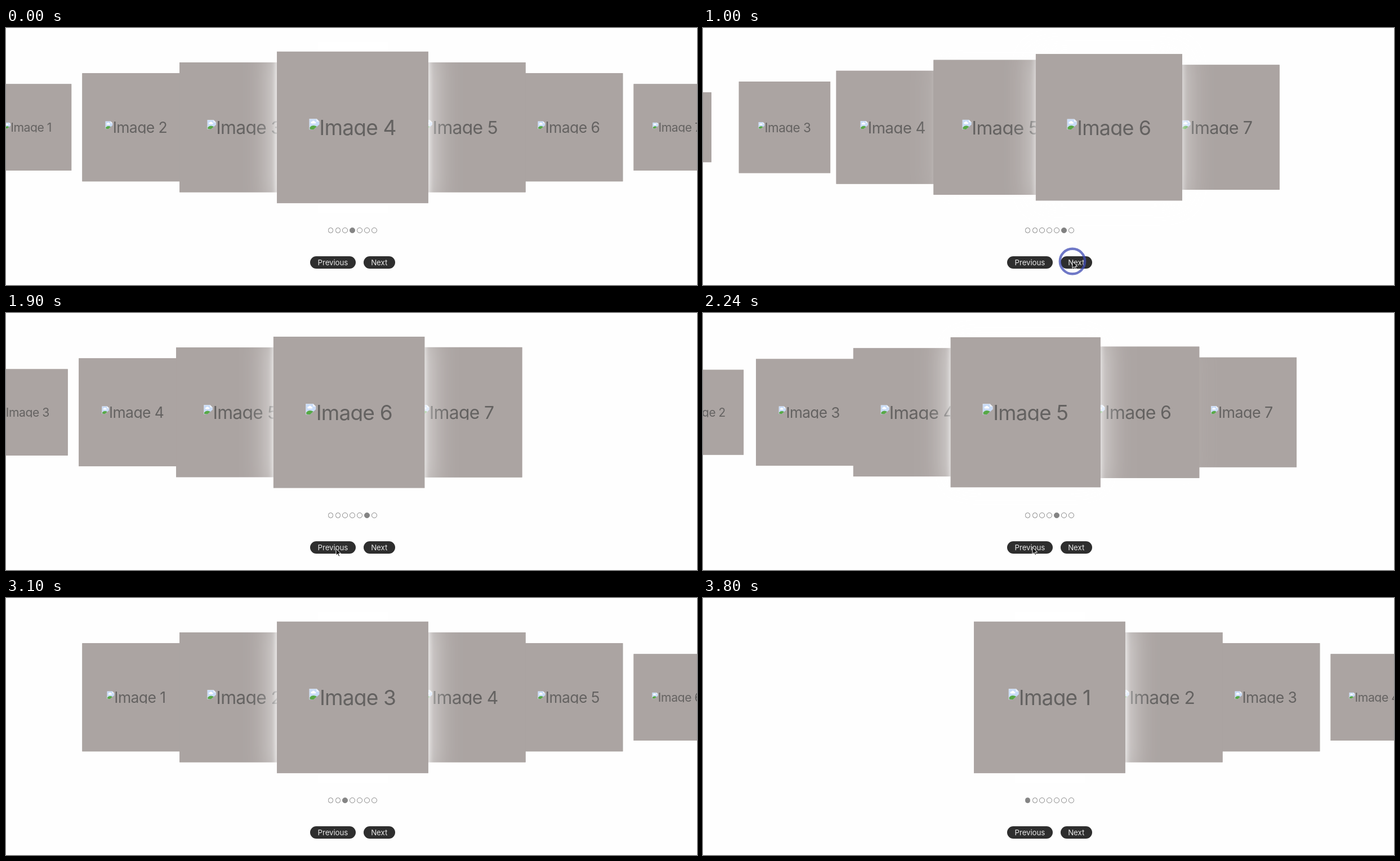
These frames come from a looping animation (1227 by 456 pixels, 3.84 s). An HTML page:

```html
<!DOCTYPE html>
<html lang="en">
<head>
<meta charset="utf-8">
<title>Image carousel</title>
<style>
  html, body { margin: 0; width: 100%; height: 100%; overflow: hidden; background: #fefefe; }
  .stage { position: relative; width: 1227px; height: 456px; overflow: hidden; font-family: Inter, "Open Sans", sans-serif; }
  .card { position: absolute; left: 0; top: 0; width: 191.8px; height: 191.8px; background: #aba4a2; }
  .glow { position: absolute; inset: 0; box-shadow: 0 0 5px 2px rgba(255,255,255,.55), 0 0 36px 3px rgba(255,255,255,.8); }
  .face { position: absolute; inset: 0; background: #aba4a2; }
  .alt { position: absolute; left: 0; right: 0; top: 85.1px; height: 22px; overflow: hidden; display: flex; justify-content: center; align-items: flex-start; white-space: pre; color: #646261; font-size: 26.5px; line-height: 23.6px; letter-spacing: -.022em; }
  .alt svg { flex: none; width: 13.3px; height: 14.3px; }
  .dot { position: absolute; top: 354.2px; width: 9.6px; height: 9.6px; box-sizing: border-box; border: 1.8px solid #808080; border-radius: 50%; }
  .dot.on { background: #808080; }
  .btn { position: absolute; top: 404.8px; height: 22.6px; border-radius: 12px; background: #2e2e2e; color: #e6e6e6; font-size: 13.3px; line-height: 22.6px; text-align: center; letter-spacing: -.005em; }
  .over { position: absolute; left: 0; top: 0; z-index: 300; }
</style>
</head>
<body>
<div class="stage" id="stage">
  <div class="btn" style="left:539.8px;width:81.2px">Previous</div>
  <div class="btn" style="left:634.6px;width:56.2px">Next</div>
  <svg class="over" width="1227" height="456">
    <circle id="ring" r="22.2" fill="none" stroke="#3f4bb4" stroke-width="4.4"/>
    <path id="cursor" d="M0 0V12.2L2.8 9.6L4.8 14L6.7 13.2L4.8 8.9H8.6Z" fill="#111" stroke="#fff" stroke-width="1" stroke-linejoin="round"/>
  </svg>
</div>
<script>
const LOOP = 3840, MOVE = 242, COUNT = 7, FIRST = 4;
const MID_X = 615.25, MID_Y = 176.1, SIZE = 191.8;

// [start time, slide to go to]
const moves = [[570, 5], [887, 6], [1287, 7], [1690, 6], [2078, 5],
               [2460, 4], [2840, 3], [3222, 2], [3545, 1]];
const clicks = moves.slice(0, 6).map(m => m[0]);
// [time, x, y]
const pointer = [[300, 672, 462], [500, 656, 414], [1390, 656, 414], [1480, 597.5, 416],
                 [1600, 586, 418], [2020, 586, 418], [2240, 585, 415.5], [2740, 585, 415.5]];

const stage = document.getElementById('stage');
const ring = document.getElementById('ring');
const cursor = document.getElementById('cursor');

const icon = `<svg viewBox="0 0 13.3 14.3">
  <path d="M0 0H9.3L13 3.7V7.2L5.2 14H0Z" fill="#c9dcf8"/>
  <path d="M2.2 5.4a1.5 1.5 0 0 1 1.6-1.7a1.9 1.9 0 0 1 3.5.3a1.2 1.2 0 0 1 .7 2.2H3Z" fill="#fff"/>
  <path d="M.6 13.4V11.2Q4.4 6.9 9.7 10L5.2 14Z" fill="#58a846"/>
  <path d="M9.3 0V3.7H13Z" fill="#f5f7fa"/>
  <path d="M.3 14V.3H9.2L12.7 3.8V7.2" fill="none" stroke="#dfe3e8" stroke-width=".6"/>
</svg>`;

function add(cls, html = '') {
  const el = document.createElement('div');
  el.className = cls;
  el.innerHTML = html;
  stage.append(el);
  return el;
}

const cards = [], dots = [];
for (let i = 1; i <= COUNT; i++) {
  cards.push(add('card', `<div class="glow"></div><div class="face"></div><div class="alt">${icon}<span>Image ${i}</span></div>`));
  const dot = add('dot');
  dot.style.left = 571.7 + 12.87 * (i - 1) + 'px';
  dots.push(dot);
}

function bezier(x1, y1, x2, y2) {
  const at = (a, b, s) => 3 * a * s * (1 - s) ** 2 + 3 * b * s * s * (1 - s) + s ** 3;
  return x => {
    if (x <= 0 || x >= 1) return x <= 0 ? 0 : 1;
    let lo = 0, hi = 1;
    for (let n = 0; n < 24; n++) {
      const s = (lo + hi) / 2;
      if (at(x1, x2, s) < x) lo = s; else hi = s;
    }
    return at(y1, y2, lo);
  };
}
const ease = bezier(.25, .1, .25, 1);
const easeInOut = bezier(.42, 0, .58, 1);
const mix = (a, b, k) => a + (b - a) * k;

function drawSlides(t) {
  let from = FIRST, to = FIRST, u = 1;
  for (const [start, slide] of moves) {
    if (t < start) break;
    from = to;
    to = slide;
    u = Math.min(1, (t - start) / MOVE);
  }
  const center = mix(from, to, easeInOut(u)), q = ease(u);
  cards.forEach((card, n) => {
    const i = n + 1;
    const dist = mix(Math.abs(i - from), Math.abs(i - to), q);
    const x = MID_X + SIZE * 1.001 * (i - center) - SIZE / 2;
    card.style.transform = `translate(${x}px, ${MID_Y - SIZE / 2}px) scale(${1.4 - .2 * dist})`;
    card.style.zIndex = Math.round(100 - 10 * dist);
    card.firstChild.style.opacity = Math.max(0, 1 - dist);
    dots[n].classList.toggle('on', i === to);
  });
}

function drawPointer(t) {
  const k = pointer.findIndex(p => p[0] > t);
  const shown = k > 0;
  cursor.style.display = ring.style.display = shown ? '' : 'none';
  if (!shown) return;
  const [t0, x0, y0] = pointer[k - 1], [t1, x1, y1] = pointer[k];
  const s = easeInOut((t - t0) / (t1 - t0));
  const place = `translate(${mix(x0, x1, s)} ${mix(y0, y1, s)})`;
  cursor.setAttribute('transform', place);
  ring.setAttribute('transform', place);
  const since = Math.min(...clicks.map(c => t - c).filter(d => d >= -20), LOOP);
  ring.style.opacity = .75 * Math.max(0, Math.min(1, (155 - since) / 30));
}

const begin = performance.now();
function frame() {
  const t = (performance.now() - begin) % LOOP;
  drawSlides(t);
  drawPointer(t);
  requestAnimationFrame(frame);
}
frame();
</script>
</body>
</html>
```
